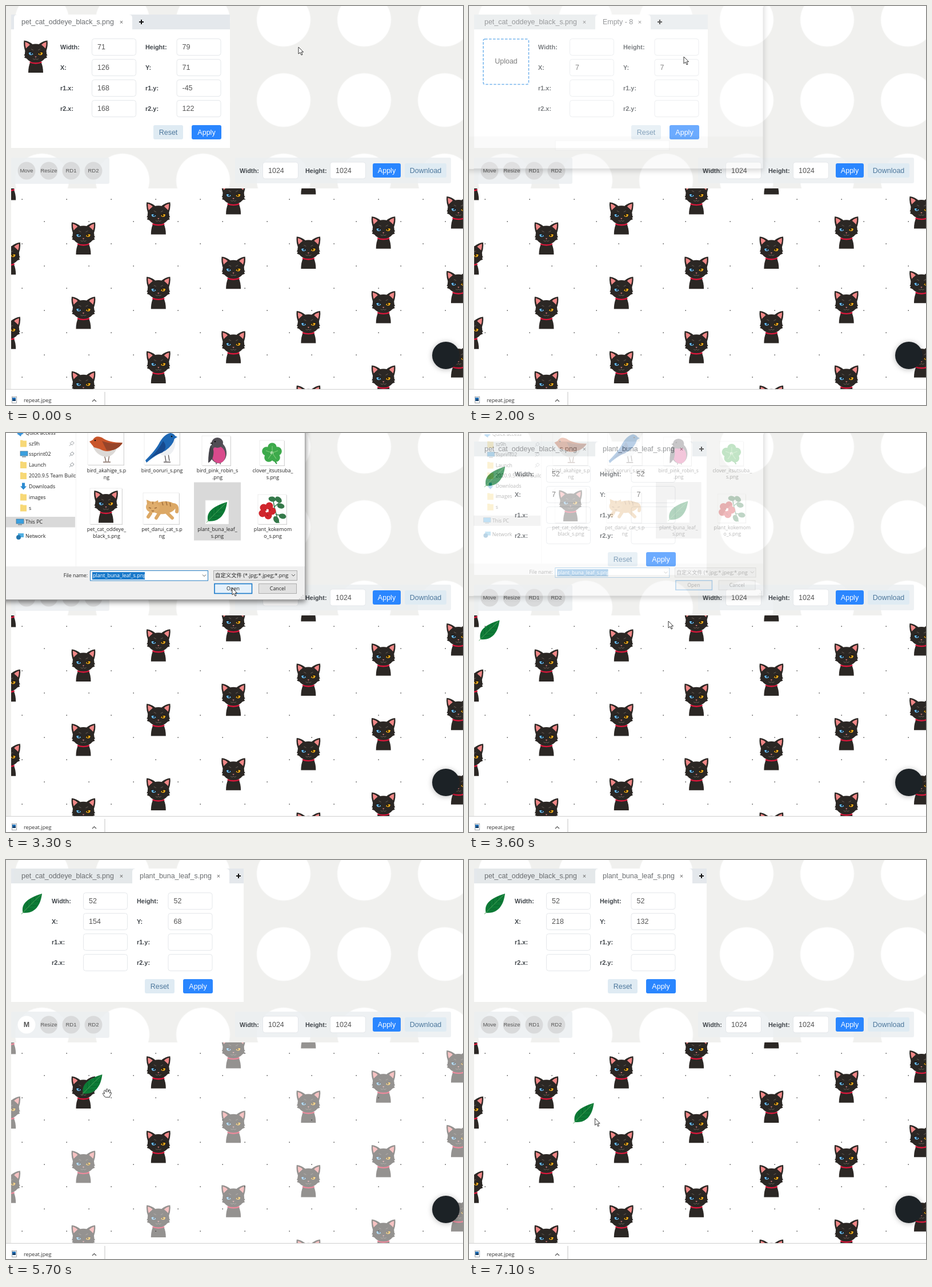
Animation, 800 px wide and 700 px high, one loop 8000 ms. Source, as an HTML page:

```html
<!DOCTYPE html>
<html lang="en">
<head>
<meta charset="utf-8">
<title>Pattern editor</title>
<style>
html, body { margin: 0; width: 100%; height: 100%; overflow: hidden; background: #f0f0ee; }
svg { display: block; width: 800px; height: 700px; }
text { font-family: "Liberation Sans", Arial, sans-serif; white-space: pre; }
.ui { font-family: "Open Sans", "Noto Sans CJK SC", "Noto Sans", sans-serif; }
</style>
</head>
<body>
<svg viewBox="0 0 800 700" xmlns="http://www.w3.org/2000/svg">
  <defs>
    <pattern id="spots" x="415.5" y="94.5" width="141" height="141" patternUnits="userSpaceOnUse">
      <circle cx="70.5" cy="70.5" r="47" fill="#fff"/>
    </pattern>
    <clipPath id="board"><path d="M9 320H800V672H9Z"/></clipPath>
    <clipPath id="side"><path d="M0 0H122V234H0Z"/></clipPath>
    <filter id="glow" x="-50%" y="-50%" width="200%" height="200%">
      <feDropShadow dx="0" dy="1" stdDeviation="5" flood-opacity=".28"/>
    </filter>
    <filter id="lift" x="-10%" y="-10%" width="120%" height="125%">
      <feDropShadow dx="1" dy="4" stdDeviation="5" flood-opacity=".5"/>
    </filter>
    <g id="cat">
      <path d="M-9 9H9C12 15 13 22 13 28.500H-13C-13 22-12 15-9 9Z" fill="#2b2724"/>
      <path d="M-20.500-28Q-12-27-5-21L-18-8Q-22-19-20.500-28ZM20.500-28Q12-27 5-21L18-8Q22-19 20.500-28Z" fill="#2b2724"/>
      <path d="M-18.500-25.500Q-13-24-10-20.500L-17-14Q-19-20-18.500-25.500ZM18.500-25.500Q13-24 10-20.500L17-14Q19-20 18.500-25.500Z" fill="#ef8686"/>
      <ellipse cy="-5.500" rx="19" ry="16.500" fill="#2b2724"/>
      <path d="M-18-6L-20.500-2L-18.500-1L-20 2L-15 4ZM18-6L20.500-2L18.500-1L20 2L15 4Z" fill="#2b2724"/>
      <path d="M-12.500-6.500Q-8-9-4-4.500Q-7-1-11-3Z" fill="#69b9ee"/>
      <path d="M12.500-6.500Q8-9 4-4.500Q7-1 11-3Z" fill="#f5ae1c"/>
      <path d="M-13-7Q-8-9.500-3.500-4.500M13-7Q8-9.500 3.500-4.500" fill="none" stroke="#0e0c0b"/>
      <circle cx="-7.500" cy="-5" r="1.500" fill="#15202a"/><circle cx="7.500" cy="-5" r="1.500" fill="#241a08"/>
      <path d="M-1.700 0H1.700L0 2Z" fill="#e98687"/>
      <path d="M-5 4Q-2 7 0 4Q2 7 5 4M-8-13l4 2M8-13l-4 2" fill="none" stroke="#85786d" stroke-width=".7"/>
      <path d="M-10.500 10Q0 14 10.500 10" fill="none" stroke="#d9173b" stroke-width="2.400"/>
    </g>
    <g id="leaf">
      <path d="M2.500 33.500C-1 18 10 8 36 0C34 17 26 36 2.500 33.500Z" fill="#0d7a36"/>
      <path d="M10 26V15M16 20V10M23 13V5M9 27H21M15 21H27M22 14H31" stroke="#0a612a" stroke-width=".8"/>
      <path d="M0 36Q14 21 34 2" fill="none" stroke="#4fa65c"/>
    </g>
    <g id="arrow"><path d="M0 0V12L3 9.4L5 14L7 13.2L5 8.8H8.6Z" fill="#fff" stroke="#222" stroke-width=".9"/></g>
    <g id="point"><path d="M-2 0Q0-2 1 0V5L7 7Q8 8 7 12L6 15H-1L-5 9Q-5 7-2 9Z" fill="#fff" stroke="#222" stroke-width=".9"/></g>
    <g id="grab"><path d="M2 12L-1 7Q-1 4 2 7L1 2Q2-1 4 2L5 4L5-1Q7-3 8 0L8 4L10 0Q12-1 12 2L11 6Q14 3 14 6L11 12V13H4Z" fill="#fff" stroke="#222" stroke-width=".9"/></g>
  </defs>
  <g id="stage"></g>
</svg>
<script>
const stage = document.getElementById("stage");
const LOOP = 8000, STEP = 100, SCALE = .7825;

const rect = (x, y, w, h, fill, extra = "") =>
  `<rect x="${x}" y="${y}" width="${w}" height="${h}" fill="${fill}" ${extra}/>`;
const text = (x, y, s, size = 12.5, fill = "#555", extra = "") =>
  `<text x="${x}" y="${y + size * .35}" font-size="${size}" fill="${fill}" ${extra}>${s}</text>`;
const path = (d, stroke, w = 1, extra = "") =>
  `<path d="${d}" fill="none" stroke="${stroke}" stroke-width="${w}" ${extra}/>`;
const shape = (d, fill) => `<path d="${d}" fill="${fill}"/>`;
const oval = (x, y, rx, ry, fill, turn = 0) =>
  `<ellipse cx="${x}" cy="${y}" rx="${rx}" ry="${ry}" fill="${fill}" transform="rotate(${turn} ${x} ${y})"/>`;
const use = (id, x, y, extra = "") => `<use href="#${id}" transform="translate(${x} ${y})" ${extra}/>`;
const MID = 'text-anchor="middle"', BOLD = 'font-weight="bold"', UI = 'class="ui"';

const label = (x, y, s) => text(x, y, s, 10.9, "#42474c", BOLD);
const field = (x, y, w, s) =>
  rect(x + .5, y - 14.5, w - 1, 29, "#fff", 'rx="4" stroke="#e4e7ea"') + text(x + 10, y, s);
const button = (x, y, w, s, main) =>
  rect(x, y - 12.5, w, 25, main ? "#2a86ff" : "#dfebf3", 'rx="3"') +
  text(x + w / 2, y, s, 12.5, main ? "#fff" : "#4d779c", MID);

// Linear interpolation through rows of [time, x, y].
function along(keys, t) {
  const i = keys.findIndex(k => k[0] > t);
  if (i < 0) return keys[keys.length - 1].slice(1);
  if (i === 0) return keys[0].slice(1);
  const [a, b] = [keys[i - 1], keys[i]], f = (t - a[0]) / (b[0] - a[0]);
  return [1, 2].map(n => a[n] + (b[n] - a[n]) * f);
}

const mouse = [
  [0, 512, 72], [200, 430, 86], [400, 290, 60], [600, 237, 28], [800, 237, 28],
  [1300, 84, 98], [1400, 84, 98], [1500, 230, 110], [1600, 376, 89], [2400, 376, 89],
  [2600, 445, 98], [2800, 376, 140], [2900, 376, 140], [3300, 396, 272],
  [3600, 349, 330], [4000, 158, 399], [4800, 158, 399], [5500, 55, 355]
];
const drag = [[5700, 154, 68], [6500, 207, 121], [6800, 218, 132]];
// Rows of [time, opacity, scale].
const fade = [[1700, 0, .955], [2000, .31, .968], [2300, 1, 1], [3300, 1, 1], [3600, .31, .97], [3800, 0, .955]];

const leafAt = t => t < 5700 ? [7, 7] : along(drag, t).map(Math.round);
const leafXY = t => { const [x, y] = leafAt(t); return [9 + x * SCALE, 320 + y * SCALE]; };

function pointer(t) {
  if (t < 5700) return along(mouse, t);
  const [x, y] = leafXY(t);
  return [x + 41, y + 30];
}

function tab(x, w, name, active) {
  const d = `M${x} 41V21Q${x} 15 ${x + 6} 15H${x + w - 6}Q${x + w} 15 ${x + w} 21V41Z`;
  return shape(d, active ? "#fff" : "#e4e8ea") +
    text(x + 13, 28, name, 12.45, "#6a6d70") + text(x + w - 19, 28, "×", 11, "#666", MID);
}

function panel(t) {
  const mode = t < 900 ? 0 : t < 3500 ? 1 : 2;
  const right = [392, 418, 416][mode], dx = [0, 26, -15][mode], plus = [237, 334, 407][mode];
  const [lx, ly] = leafAt(t);
  const rows = [
    ["Width:", "Height:", ["71", "", "52"][mode], ["79", "", "52"][mode]],
    ["X:", "Y:", mode ? lx : 126, mode ? ly : 71],
    ["r1.x:", "r1.y:", mode ? "" : 168, mode ? "" : -45],
    ["r2.x:", "r2.y:", mode ? "" : 168, mode ? "" : 122]
  ];
  let s = rect(9, 15, right - 9, 27, "#e4e8ec") + rect(9, 41, right - 9, 208, "#fff");
  s += tab(14, 207, "pet_cat_oddeye_black_s.png", !mode);
  if (mode) s += mode === 1 ? tab(221, 97, "Empty - 8", true) : tab(221, 170, "plant_buna_leaf_s.png", true);
  s += path(`M${plus - 4} 28h8M${plus} 24v8`, "#111", 2);
  if (mode === 0) s += use("cat", 52, 88.5);
  if (mode === 1) s += rect(25, 58, 79.5, 79.5, "#fff", 'rx="3" stroke="#3d96e6" stroke-width="1.6" stroke-dasharray="4.5 2.5"') +
    text(65, 97, "Upload", 12.5, "#444", MID);
  if (mode === 2) s += use("leaf", 27, 59);
  rows.forEach(([a, b, u, v], i) => {
    const y = 72 + 36 * i;
    s += label(95 + dx, y, a) + field(150 + dx, y, 78, u) + label(244 + dx, y, b) + field(298.5 + dx, y, 78, v);
  });
  return s + button(258 + dx, 221.5, 52, "Reset") + button(325 + dx, 221.5, 52, "Apply", true);
}

function toolbars(moving) {
  let s = rect(9, 266, 172, 46, "#eceff1", 'rx="3" opacity=".85"') + rect(401, 266, 378, 45, "#eceff1", 'rx="3" opacity=".85"');
  ["Move", "Resize", "RD1", "RD2"].forEach((name, i) => {
    const x = 36 + 39 * i, on = moving && !i;
    s += oval(x, 289, 15.5, 15.5, on ? "#fff" : "#d9dadb") +
      text(x, 289, on ? "M" : name, on ? 12.5 : 9.5, "#555", MID + (on ? " " + BOLD : ""));
  });
  return s + label(409, 289, "Width:") + field(449, 288.5, 63, "1024") + label(524, 289, "Height:") +
    field(567, 288.5, 63, "1024") + button(642, 288.5, 49, "Apply", true) + button(698, 288.5, 73, "Download");
}

function board(t, dim) {
  let s = rect(9, 320, 791, 352, "#fff");
  for (let i = 0; i < 20; i++)
    for (let j = 0; j < 9; j++)
      if ((i + j) % 2 === 0) s += rect(27.5 + 39 * i, 338.5 + 39 * j, 1.4, 1.4, "#333");
  for (let k = -1; k < 6; k++)
    for (let m = -2; m < 7; m++) {
      const y = 407.5 - 35.2 * k + 130.6 * m;
      if (y < 290 || y > 701) continue;
      const lead = k === 0 && m === 0 || k === 1 && (m === 0 || m === 1);
      s += use("cat", 135.5 + 131.3 * k, y, lead ? "" : `opacity="${1 - dim / 2}"`);
    }
  if (t >= 3500) { const [x, y] = leafXY(t); s += use("leaf", x + 3, y + 3); }
  return `<g clip-path="url(#board)">${s}</g>`;
}

function footer() {
  return `<circle cx="770" cy="613" r="24" fill="#1f2428" filter="url(#glow)"/>` +
    rect(0, 672, 800, 28, "#fff") + rect(0, 672, 800, 1, "#cfcfcf") + rect(172.5, 677, 1, 23, "#c4c4c4") +
    rect(10.5, 685.5, 8, 11, "#fff", 'stroke="#8a9096" stroke-width=".8"') + rect(11, 687, 6, 6, "#2271b8") + rect(12, 690, 5, 3, "#173f68") +
    text(31, 692, "repeat.jpeg", 9.2, "#333", UI) + path("M151 694L154.5 690.5L158 694", "#555", 1.2);
}

const folder = (x, y) => shape(`M${x} ${y - 6}h4l1 1h6v11h-11Z`, "#f7d877");
const screen = (x, y) => rect(x, y - 5, 13, 8, "#3ba0df", 'stroke="#47718c" stroke-width=".7"') + rect(x + 3, y + 4, 7, 1.5, "#7c8d99");
const globe = (x, y) => rect(x + 3, y - 5, 10, 7, "#52afe2") + oval(x + 4, y + 2, 4, 4, "#2476ad");
const down = (x, y) => shape(`M${x + 3} ${y - 6}h5v6h3l-5.5 6l-5.5-6h3Z`, "#2d8bd0");
const note = (x, y, s, extra = "") => text(x, y, s, 8.9, "#222", UI + " " + extra);

function sidebar() {
  const rows = [["sz9h", 18.5, folder, 1], ["ssprint02", 37, screen, 1], ["Launch", 56, folder, 1],
    ["2020.9.5 Team Build", 75, folder], ["Downloads", 93.5, down], ["images", 112.5, folder], ["s", 131.5, folder]];
  let s = shape("M19 1l4-2l2-4l2 4l4 2l-4 2l-1 3l-3-2Z", "#3a96dd") + note(34, 0, "Quick access");
  rows.forEach(([name, y, icon, pin]) => {
    s += icon(25, y) + note(40, y, name);
    if (pin) s += path(`M111 ${y + 4}l3-3m-2-2l4 4m-3-4l3-3l3 3l-3 3`, "#8f9499", 1);
  });
  s += rect(0, 147, 121, 18.5, "#d9d9d9") + screen(18, 156) + note(34, 156, "This PC") +
    globe(18, 181) + note(34, 181, "Network");
  return `<g clip-path="url(#side)">${s}</g>` + rect(122, 0, 1, 234, "#f2f2f2");
}

const card = (x, y, w, h) => rect(x + 1, y + 1, w, h, "#ccc") + rect(x, y, w, h, "#fff", 'stroke="#e5e5e5" stroke-width=".7"');
const blobs = (pts, r, fill) => pts.map(([x, y]) => oval(x, y, r, r, fill)).join("");

const redBird = () => card(143, -8, 63, 64) +
  path("M172 38L175 50M181 38L179 50M170 51h13", "#806a60", 1.4) +
  shape("M152 24Q160 41 176 42Q190 40 195 24Z", "#dcd9d6") +
  shape("M146 15L152 12Q157 3 168 8Q180 17 204 17Q202 24 186 30Q176 35 164 28L154 25Z", "#c8552a") +
  shape("M168 14Q184 20 204 17Q194 33 176 30Z", "#96452a") + oval(156, 13, 1.3, 1.3, "#111");

const blueBird = () => card(242, -8, 62, 64) +
  path("M278 38L280 50M284 36L286 49M276 51h12", "#605b5c", 1.4) +
  shape("M279 14L296 12Q298 28 288 37Q280 42 270 38Z", "#eef0f3") +
  shape("M300 7L295 10Q292 22 279 31Q262 38 246 52L244 48Q260 32 267 20Q276 2 288 0Q294 1 296 5Z", "#1f68b4") +
  shape("M248 47Q264 35 275 14Q284 24 274 34Q262 38 248 47Z", "#174a8e") + oval(290, 6, 1.3, 1.3, "#111");

const pinkBird = () => card(343, 5, 50, 52) +
  oval(371, 34, 15, 19, "#55525a", -8) + oval(372, 38, 12, 15, "#d94a8c", -8) +
  oval(370, 17, 10, 9, "#504d54") + shape("M358 22Q366 27 362 43Q357 52 354 52Q354 33 358 22Z", "#45434a") +
  shape("M361 16L357 18L362 20Z", "#222") + oval(366, 15, 1.3, 1.3, "#111") + path("M368 52v3M375 52v3", "#555", 1.4);

const clover = () => card(444, 13, 43, 44) + path("M466 35Q468 47 474 54", "#2a963e", 2) +
  blobs([[466, 25], [475, 32], [472, 43], [460, 43], [456, 32]], 7.8, "#3daa4b") +
  path("M466 35V23M466 35L476 31M466 35L473 45M466 35L459 45M466 35L455 31", "#7fcc7a", 1.2);

const lazyCat = () => card(240, 105, 63, 55) +
  path("M291 126Q301 125 299 138M270 138L263 149M282 140L291 149M253 141L249 147", "#dca865", 6, 'stroke-linecap="round"') +
  oval(276, 131, 21, 11, "#dca865", -6) + oval(257, 130, 12, 10, "#e0ae6d") +
  shape("M247 126L246 117L255 121ZM260 121L266 118L268 128Z", "#dca865") +
  path("M273 121l2 6M280 120l2 7M287 122l1 7M257 121v4M250 131l4 1M260 132l4-1M255 136q2 2 4 0", "#9b6938", 1.3);

const berries = () => card(441, 108, 50, 52) + path("M478 158Q470 136 467 113M469 130L481 120M472 143L486 145", "#34784a", 1.5) +
  [[466, 116, 10], [477, 117, 40], [481, 128, 15], [484, 146, 10], [473, 152, 60]].map(([x, y, a]) => oval(x, y, 6.5, 4.5, "#35794a", a)).join("") +
  blobs([[451, 131], [461, 128], [449, 141], [459, 145], [466, 137]], 6.5, "#d0252c") +
  path("M453 134l3 3M461 133l2 3M456 143l3 2", "#8f1218", 1);

function files([px, py], picked) {
  const names = [["bird_akahige_s.p", "ng"], ["bird_ooruri_s.png"], ["bird_pink_robin_s", ".png"], ["clover_itsutsuba_", "s.png"],
    ["pet_cat_oddeye_", "black_s.png"], ["pet_darui_cat_s.p", "ng"], ["plant_buna_leaf_", "s.png"], ["plant_kokemom", "o_s.png"]];
  let marks = "", labels = "";
  names.forEach((lines, i) => {
    const x = 176 + 97 * (i % 4), row = i >> 2, top = row ? 86.5 : -16;
    const over = Math.abs(px - x) < 41 && py > top && py < top + 102, chosen = picked && i === 6;
    if (over || chosen) marks += rect(x - 41, top, 82, 102, chosen ? "#d9d9d9" : "#e5f3f8");
    lines.forEach((line, n) => labels += note(x, (row ? 169 : 66) + 11.5 * n, line, MID));
  });
  return marks + redBird() + blueBird() + pinkBird() + clover() +
    card(147, 97, 56, 63) + use("cat", 175, 129) + lazyCat() +
    card(349, 118, 41, 42) + use("leaf", 351, 121) + berries() + labels;
}

function dialog(t, at) {
  if (t < 1800 || t >= 3800) return "";
  const [alpha, k] = along(fade, t), ready = t >= 2200, picked = t >= 2900;
  let s = rect(-20, -120, 543.5, 412.5, "#fff", 'filter="url(#lift)"') + rect(-20, 234, 543.5, 58.5, "#f0f0f0") +
    path("M523.5 0V292.5H0", "#8c8c8c", .8) +
    rect(147.5, 241.5, 206, 17.5, "#fff", ready ? 'stroke="#2980c5"' : 'stroke="#e2e2e2"');
  if (ready) {
    const open = at[1] > 262 && at[1] < 284 && at[0] > 364 && at[0] < 431;
    s += sidebar() + files(at, picked) + note(143, 249.5, "File name:", 'text-anchor="end"') +
      (picked ? rect(151, 244, 92, 13, "#1979ca") + text(152, 250, "plant_buna_leaf_s.png", 9, "#fff", UI) : rect(150, 244, 1, 12, "#111")) +
      path("M344 248.5l3 3l3-3", "#555") +
      rect(363.5, 241.5, 146, 17, "#e5e5e5", 'stroke="#adadad"') + path("M500 248l3 3l3-3", "#555") +
      text(366, 250, "自定义文件 (*.jpg;*.jpeg;*.png", 9.4, "#222", UI) +
      rect(365, 264.5, 65.5, 17, open ? "#e5f1fb" : "#e1e1e1", 'stroke="#1979ca" stroke-width="1.6"') + note(397.5, 273, "Open", MID) +
      rect(442.5, 264.5, 66, 17, "#e1e1e1", 'stroke="#adadad"') + note(475.5, 273, "Cancel", MID);
    s += blobs([[520, 285], [520, 288], [520, 291], [517, 288], [517, 291], [514, 291]], .8, "#aaa");
  }
  return `<g opacity="${alpha}" transform="translate(262 75) scale(${k}) translate(-262 -75)">${s}</g>`;
}

function scene(t) {
  const at = pointer(t), moving = t >= 5100 && t < 7000;
  const dim = moving ? 1 : t >= 7000 && t < 7100 ? .5 : 0;
  const link = t >= 500 && t < 1000 || t >= 1300 && t < 1500;
  return rect(0, 0, 800, 700, "#f0f0ee") + rect(0, 0, 800, 320, "url(#spots)") +
    panel(t) + toolbars(moving) + board(t, dim) + footer() + dialog(t, at) +
    use(moving ? "grab" : link ? "point" : "arrow", ...at);
}

let shown = -1;
function tick(now) {
  const t = Math.floor(now % LOOP / STEP) * STEP;
  if (t !== shown) stage.innerHTML = scene(shown = t);
  requestAnimationFrame(tick);
}
tick(performance.now());
</script>
</body>
</html>
```
